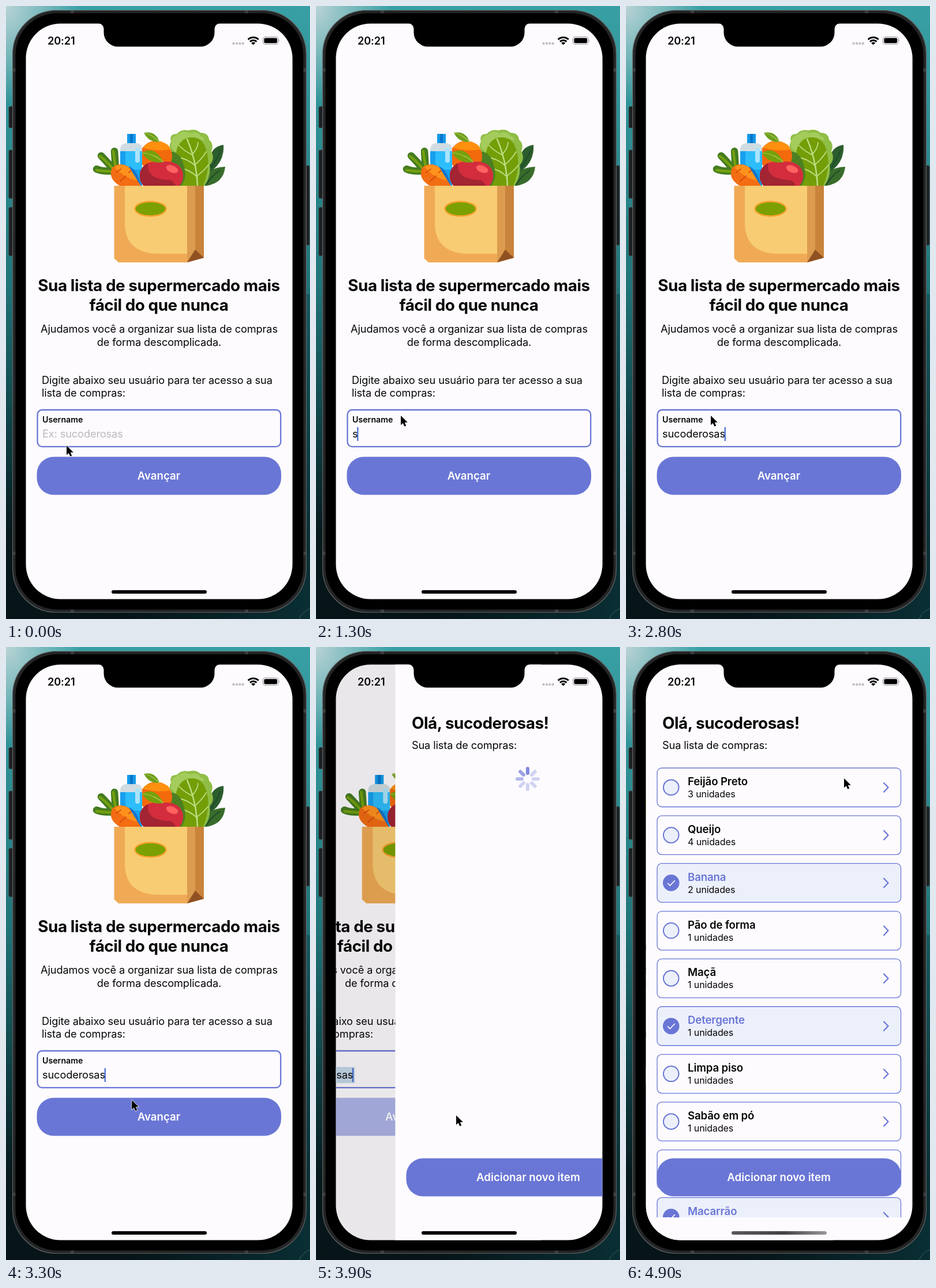
These frames come from a looping animation (527 px wide and 1064 px high, 5000 ms). An HTML page:

```html
<!DOCTYPE html>
<html lang="pt-BR">
<head>
<meta charset="utf-8">
<title>Lista de compras</title>
<style>
  html, body { margin: 0; width: 100%; height: 100%; overflow: hidden; }
  body {
    background:
      radial-gradient(130px 170px at 0 0, #b9d3d5, transparent),
      linear-gradient(90deg, transparent 40%, #0c454b88) 0 500px / 100% 564px no-repeat,
      linear-gradient(#38a0a5, #2b8a8e 25%, #217579 45%, #10474c 66%, #06191d 86%, #061418);
  }
  svg { display: block; width: 527px; height: 1064px; font-family: Inter, "Open Sans", sans-serif; }
  text { fill: #060506; white-space: pre; font-size: 18.2px; letter-spacing: -.12px; }
  .h1 { font-size: 27.8px; font-weight: 700; letter-spacing: -.42px; }
  .mid { text-anchor: middle; }
  .semi { font-weight: 600; font-size: 18.6px; }
  .label { font-size: 14.2px; letter-spacing: 0; }
  .unit { font-size: 16px; letter-spacing: -.1px; }
  .cta { font-size: 18.7px; font-weight: 600; fill: #fff; letter-spacing: 0; }
  .purple { fill: #6a76d5; }
  .line { fill: none; stroke: #6a76d5; stroke-linecap: round; stroke-linejoin: round; }
  .paper { fill: #fdfbfe; }
</style>
</head>
<body>
<svg viewBox="0 0 527 1064">
  <defs>
    <clipPath id="screen"><rect x="34.5" y="30.5" width="462" height="999" rx="60"/></clipPath>
    <clipPath id="listArea"><rect x="34" y="190" width="464" height="800"/></clipPath>
    <clipPath id="bottle"><path d="M198 312V250Q198 238 210 238H225Q236 238 236 250V312Z"/></clipPath>
    <clipPath id="tomato"><rect x="232" y="270" width="75" height="50" rx="27" ry="23"/></clipPath>
    <linearGradient id="bar"><stop stop-color="#5b585d"/><stop offset=".55" stop-color="#454247"/><stop offset="1" stop-color="#9a979d"/></linearGradient>
  </defs>

  <!-- phone body -->
  <path d="M508 1064A34 34 0 0 1 527 1046" fill="none" stroke="#3d5c5e"/>
  <g fill="#1d2022" stroke="#3b3f41" stroke-width=".8">
    <rect x="5" y="174.500" width="8" height="37" rx="2"/>
    <rect x="5" y="250" width="8" height="84" rx="2"/>
    <rect x="5" y="349.500" width="8" height="84" rx="2"/>
    <rect x="518" y="277" width="8" height="138" rx="2"/>
  </g>
  <rect x="11.500" y="7.500" width="509" height="1045" rx="76" fill="#242526" stroke="#626465" stroke-width="1.200"/>
  <g fill="#3d3f40">
    <path d="M112 8h6v5h-6zM414 8h6v5h-6zM112 1047h6v5h-6zM414 1047h6v5h-6z"/>
    <path d="M12 108h5v6h-5zM515 108h5v6h-5zM12 947h5v6h-5zM515 947h5v6h-5z"/>
  </g>
  <rect x="16.500" y="12.500" width="499" height="1035" rx="72" fill="#000"/>

  <g clip-path="url(#screen)">
    <g id="login">
      <rect class="paper" x="34" y="30" width="464" height="1000"/>

      <!-- lettuce and dark leaves -->
      <path d="M354 263Q357 244 377 241Q379 268 358 285L350 298Z" fill="#2c5d2d"/>
      <path d="M340 312Q344 280 380 279Q377 308 347 312Z" fill="#386c2b"/>
      <path d="M347 310Q357 294 371 285M355 281Q366 267 372 250" fill="none" stroke="#19462a" stroke-width="1.500"/>
      <path d="M301 312Q284 298 288 278Q281 266 287 254Q281 243 286 235Q282 222 296 222Q304 213 316 216Q329 212 337 220Q351 220 352 232Q361 240 356 252Q363 266 353 276Q356 295 344 312Z" fill="#8fbd45"/>
      <path d="M287 247Q281 228 298 223Q309 214 318 221Q332 216 337 226Q345 227 343 234Q327 225 312 229Q298 234 296 256Z" fill="#a4cc5c"/>
      <path d="M301 312Q289 270 297 246Q305 229 321 228Q341 228 347 249Q356 276 342 312Z" fill="#749e08"/>
      <g fill="none" stroke="#bfdd83" stroke-width="1.800" stroke-linecap="round">
        <path d="M332 312Q330 268 314 231" stroke-width="2.500"/>
        <path d="M324 259Q308 251 300 242M329 278Q314 264 297 263M332 297Q318 284 302 281M323 257Q332 248 333 237M328 275Q340 265 347 253M331 295Q343 286 351 276"/>
      </g>
      <path d="M276 253Q301 248 308 276Q315 297 304 312H285Z" fill="#4c8023"/>

      <!-- orange -->
      <ellipse cx="260" cy="261" rx="28" ry="27" fill="#f36a0c"/>
      <path d="M237 246Q248 232 270 236Q284 240 285 249Q260 253 237 246Z" fill="#ff900f"/>
      <path d="M239 220Q260 216 266 236Q247 237 239 220Z" fill="#6f9e1d"/>
      <path d="M239 220Q252 222 266 236" fill="none" stroke="#a6ca5a" stroke-width="1.200"/>

      <!-- bottle -->
      <path d="M210 222h15v18h-15z" fill="#159be9"/>
      <path d="M215 222h5v18h-5z" fill="#0876cb"/>
      <g clip-path="url(#bottle)">
        <path d="M198 237h39v76h-39z" fill="#d0dce1"/>
        <path d="M198 252h39v61h-39z" fill="#2dbdfb"/>
        <path d="M198 252h9V274Q209 283 221 284H237V313H198Z" fill="#179fee"/>
        <rect x="224" y="246" width="8" height="26" rx="4" fill="#a9e4fb"/>
      </g>

      <!-- carrot -->
      <g fill="none" stroke-linecap="round">
        <path d="M190 285Q189 266 188 252M188 286Q175 270 165 260M186 286Q168 288 157 283" stroke="#457c20" stroke-width="12.500"/>
        <path d="M190 281Q188 268 186 252M184 281Q174 269 163 261M182 287Q169 287 157 285" stroke="#75a10e" stroke-width="4.500"/>
      </g>
      <path d="M184 281Q195 270 211 278Q225 288 234 312H197Q176 299 184 281Z" fill="#f26d13"/>
      <path d="M188 280Q198 271 211 279Q221 286 228 303Q207 300 188 280Z" fill="#ff921d"/>
      <path d="M191 289l8-6M198 304l10-9M213 289l6-5" stroke="#d94e0d" stroke-width="2" stroke-linecap="round"/>
      <path d="M213 278Q227 283 234 312Q227 302 213 278Z" fill="#1474cc"/>

      <!-- tomato -->
      <g clip-path="url(#tomato)">
        <path d="M232 270h76v50h-76z" fill="#d32d3d"/>
        <path d="M232 270H247Q243 290 258 297Q270 302 284 302Q291 304 295 313V320H232Z" fill="#a32432"/>
        <ellipse cx="288" cy="283" rx="11" ry="6" transform="rotate(22 288 283)" fill="#ff6260"/>
      </g>
      <path d="M236 255Q258 241 273 271Q248 275 236 255Z" fill="#76a00c"/>
      <path d="M236 255Q256 256 273 271" fill="none" stroke="#a9cc55" stroke-width="1.200"/>

      <!-- paper bag -->
      <path d="M187.500 312H314V445H195L187.500 438Z" fill="#f0aa56"/>
      <path d="M206 312H314V430H260Q206 427 206 376Z" fill="#f8cc72"/>
      <path d="M314 312H343V437L314 445Z" fill="#c9833b"/>
      <path d="M314 312H328V423L314 445Z" fill="#dc9c4f"/>
      <path d="M328 423L343 437L314 445Z" fill="#905122"/>
      <ellipse cx="250.500" cy="352" rx="27" ry="12.500" fill="#7ca003" stroke="#f5a02b" stroke-width="2.300"/>

      <g class="mid">
        <text class="h1" x="265" y="494.500">Sua lista de supermercado mais</text>
        <text class="h1" x="265" y="528.500">fácil do que nunca</text>
        <text x="265.500" y="567">Ajudamos você a organizar sua lista de compras</text>
        <text x="265.500" y="589.500">de forma descomplicada.</text>
      </g>
      <text x="62" y="655.500">Digite abaixo seu usuário para ter acesso a sua</text>
      <text x="62" y="678">lista de compras:</text>

      <rect class="line" x="54.500" y="701" width="421.700" height="63.800" rx="8" stroke-width="2.300"/>
      <text class="semi label" x="63" y="723">Username</text>
      <rect id="selection" x="60" y="729" width="115" height="28" fill="#c4d8e9"/>
      <text id="field" x="63" y="749"></text>
      <rect id="caret" y="731" width="2.200" height="24" fill="#426bd0"/>

      <rect id="next" class="purple" x="53.500" y="782.500" width="423.500" height="66" rx="29"/>
      <text class="cta mid" x="265" y="822">Avançar</text>
      <rect id="dim" x="34" y="30" width="464" height="1000"/>
    </g>

    <g id="home">
      <rect class="paper" x="34.500" y="30" width="464" height="1000"/>
      <text class="h1" id="hello" x="63" y="142"></text>
      <text x="63" y="176.500">Sua lista de compras:</text>
      <g id="spinner" transform="translate(264 229)"></g>
      <g id="list" clip-path="url(#listArea)"></g>
      <rect class="purple" x="53.500" y="887.500" width="423.500" height="66" rx="29"/>
      <text class="cta mid" x="265" y="927">Adicionar novo item</text>
    </g>

    <rect id="homeBar" x="183" y="1014" width="165" height="6" rx="3"/>
  </g>

  <!-- notch and status bar -->
  <path d="M160 30A10 10 0 0 1 169.500 40V46A24.500 24.500 0 0 0 194 70.500H337A24.500 24.500 0 0 0 361.500 46V40A10 10 0 0 1 371 30Z"/>
  <text class="semi" x="72" y="67" style="font-size:18.200px">20:21</text>
  <g fill="#c3c0c5">
    <circle cx="394.500" cy="65" r="2.200"/><circle cx="400" cy="65" r="2.200"/>
    <circle cx="405.400" cy="65" r="2.200"/><circle cx="410.800" cy="65" r="2.200"/>
  </g>
  <g fill="none" stroke="#000" stroke-width="3">
    <path d="M419.700 58.200A13 13 0 0 1 437.700 58.200M423 61.800A8.200 8.200 0 0 1 434.400 61.800"/>
    <path d="M428.700 67.500L425.200 64.200Q428.700 61.500 432.200 64.200Z" fill="#000" stroke="none"/>
  </g>
  <rect x="445.500" y="53.500" width="26.500" height="13" rx="4" fill="none" stroke="#a19ea3" stroke-width="1.200"/>
  <rect x="447.400" y="55.400" width="22.700" height="9.200" rx="2.300"/>
  <path d="M473.300 57.800Q475.400 60 473.300 62.200Z" fill="#a19ea3"/>

  <path id="cursor" d="M0 0V16.300L3.700 12.900L6.300 18.800L9.200 17.500L6.700 11.700H11.800Z" fill="#000" stroke="#fff" stroke-width="1.300" paint-order="stroke"/>
</svg>

<script>
const $ = id => document.getElementById(id);
const USER = 'sucoderosas';
const LOOP = 5000, STEP = 100;
const PUSH = 3750, WIDTH = 462;

const items = [
  ['Feijão Preto', 3], ['Queijo', 4], ['Banana', 2, true], ['Pão de forma', 1], ['Maçã', 1],
  ['Detergente', 1, true], ['Limpa piso', 1], ['Sabão em pó', 1], ['Arroz', 1], ['Macarrão', 1, true]
];

const row = ([name, count, done], i) => `
  <g transform="translate(0 ${210 + i * 82.85})">
    <rect class="line" x="54" width="422.500" height="67.500" rx="8" stroke-width="1.300"
      style="fill:${done ? '#ecf0fb' : '#fdfbfe'}"/>
    <circle class="line" cx="78.200" cy="33.700" r="13.300" stroke-width="2"
      style="fill:${done ? '#6a76d5' : '#ecf0fb'}"/>
    ${done ? '<path d="M72 34l4.300 4.300l8.400-8.800" fill="none" stroke="#fff" stroke-width="1.600"/>' : ''}
    <text class="semi ${done ? 'purple' : ''}" x="107" y="30">${name}</text>
    <text class="unit" x="107" y="51">${count} unidades</text>
    <path class="line" d="M447 26l7.500 7.800l-7.500 7.800" stroke-width="2.200"/>
  </g>`;

$('list').innerHTML = items.map(row).join('');
$('hello').textContent = `Olá, ${USER}!`;
$('spinner').innerHTML = Array.from({ length: 8 }, (_, i) =>
  `<rect x="-3" y="-21" width="6" height="14" rx="3" fill="#6a76d5" transform="rotate(${i * 45})"/>`).join('');
const spokes = [...$('spinner').children];

// [time, x, y] of the pointer tip
const path = [
  [0, 105, 763], [100, 105, 763], [700, 147, 711], [2900, 147, 711],
  [3500, 243, 813], [4000, 243, 813], [4400, 352, 330], [4800, 378, 228], [5000, 378, 228]
];

const clamp = v => Math.min(1, Math.max(0, v));
const ease = v => v * v * (3 - 2 * v);
const show = (id, on) => $(id).style.display = on ? '' : 'none';
const shift = (id, x, y = 0) => $(id).setAttribute('transform', `translate(${x} ${y})`);

function pointer(t) {
  const i = path.findIndex(p => p[0] > t);
  const [t0, x0, y0] = path[i - 1], [t1, x1, y1] = path[i];
  const k = ease((t - t0) / (t1 - t0));
  return [x0 + (x1 - x0) * k, y0 + (y1 - y0) * k];
}

// Critically damped spring, 0 to 1
function pushed(t) {
  if (t >= 4300) return 1;
  const s = 19 * Math.max(0, t - PUSH) / 1000;
  return 1 - (1 + s) * Math.exp(-s);
}

function render(t) {
  const typed = t < 1300 ? 0 : Math.min(USER.length, 1 + Math.floor((t - 1300) / 140));
  const field = $('field');
  field.textContent = typed ? USER.slice(0, typed) : `Ex: ${USER}`;
  field.style.fill = typed ? '' : '#bbb9bd';
  $('caret').setAttribute('x', typed ? 61.7 + field.getComputedTextLength() : 62);
  show('caret', t >= 800);
  show('selection', t >= 3600);

  const fade = clamp((t - 3800) / 250);
  $('next').style.opacity = t < 3700 ? 1 : .22 + .78 * fade;

  const p = pushed(t);
  shift('login', -.3 * WIDTH * p);
  shift('home', WIDTH * (1 - p));
  $('dim').style.opacity = .1 * p;
  $('homeBar').setAttribute('fill', t >= 4000 ? 'url(#bar)' : '#000');

  const loaded = t >= 4500;
  show('spinner', !loaded);
  show('list', loaded);
  const head = Math.floor(t / 100) + 1;
  spokes.forEach((s, i) => s.style.opacity = Math.max(.3, .85 - .18 * ((head - i) % 8)));

  show('cursor', t < 4000 || t >= 4400);
  shift('cursor', ...pointer(t));
}

function tick() {
  render(Math.floor(performance.now() % LOOP / STEP) * STEP);
  requestAnimationFrame(tick);
}
tick();
</script>
</body>
</html>
```
